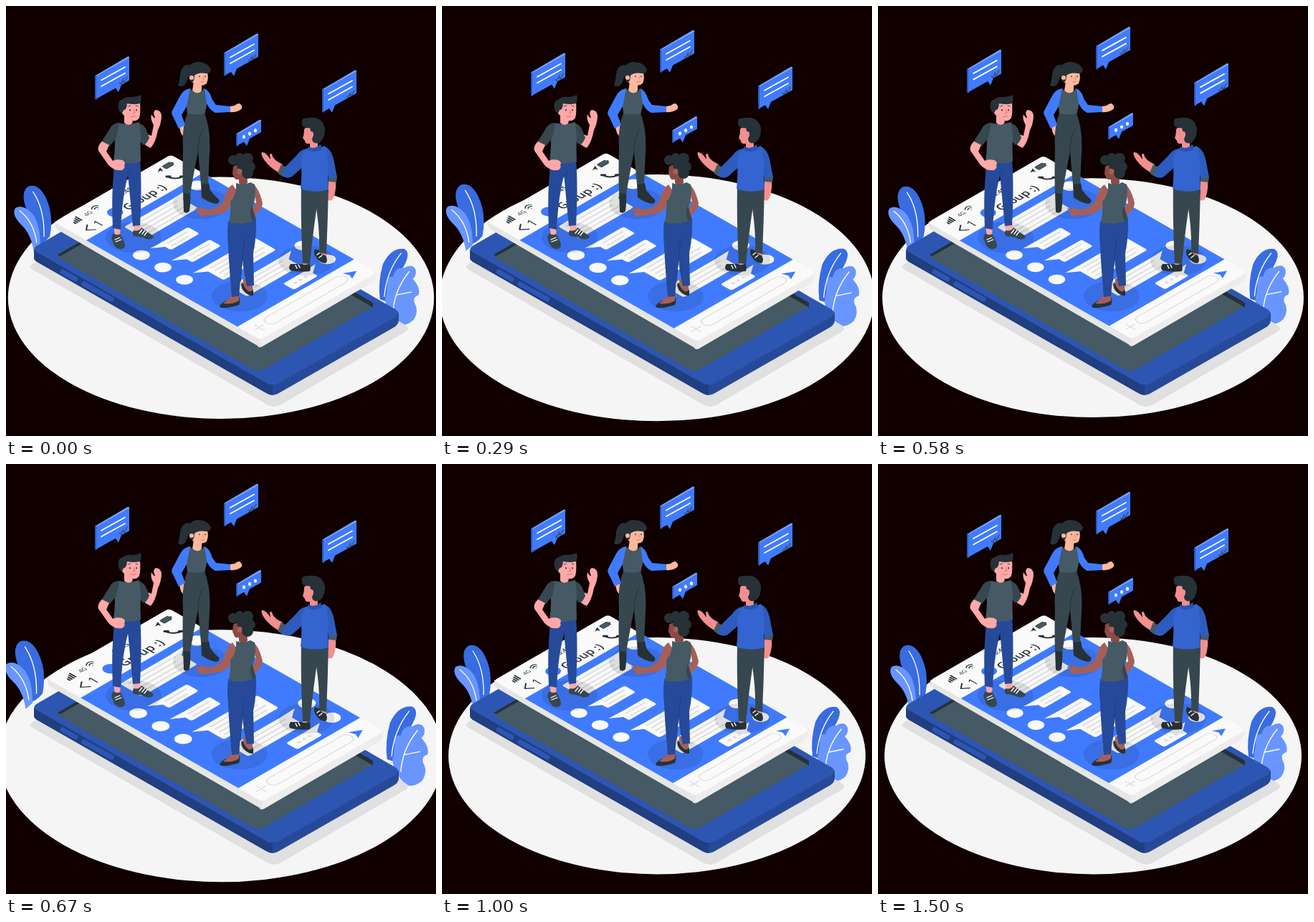
An HTML page that plays this animation: 600 by 600 pixels, repeating every 1540 ms.

```html
<!DOCTYPE html>
<html lang="en">
<head>
<meta charset="utf-8">
<title>Group chat</title>
<style>
html, body { margin: 0; width: 100%; height: 100%; overflow: hidden; background: #100000; }
svg { display: block; width: 100vw; height: 100vh; }
.blue { fill: #407bff; }
.mid { fill: #2d56b3; }
.deep { fill: #264a99; }
.slate { fill: #455a64; }
.char { fill: #37474f; }
.ink { fill: #263238; }
.pink { fill: #ffa8a7; }
.rose { fill: #f28f8f; }
.peach { fill: #ffb89d; }
.brown { fill: #a65f58; }
.white { fill: #fafafa; }
.line { fill: none; stroke-linecap: round; stroke-linejoin: round; }
text { font-family: "Open Sans", "Noto Sans", sans-serif; fill: #263238; }
</style>
</head>
<body>
<svg viewBox="0 0 600 600">
  <rect width="600" height="600" fill="#100000"/>
  <ellipse data-beat="300 407.2" cx="300" cy="407.2" rx="291" ry="165.2" fill="#f5f5f5"/>

  <g data-beat="294 347">
    <path fill="#386ce0" d="M48 334Q44 305 34 285Q25 261 37 253.500Q50 249 60 268Q72 292 66 322Q58 332 48 334Z"/>
    <path fill="#6995ff" d="M44 342Q40 318 27 306Q13 292 19 283Q30 277 43 292Q53 306 53 334Z"/>
    <path fill="#386ce0" d="M517 408Q514 385 521 360Q532 337 550 339Q560 344 550 362Q536 385 529 412Z"/>
    <path fill="#6995ff" d="M524 410Q527 396 527 385Q526 376 535 377Q538 364 550 365Q562 358 566 368Q567 376 562 380Q573 392 570 402Q562 404 564 412Q571 424 563 436Q552 446 541 441Q526 425 524 410Z"/>
    <path class="line" stroke="#fff" stroke-width="1.300" d="M43 261Q59 285 58 322M25 287Q44 302 48 330M546 345Q526 370 523 404M557 370Q537 395 535 424M540 402L560 398"/>
  </g>

  <path fill="#e0e0e0" d="M37 360L60 345L540 435L557 445Q565 450 557 455L384 556Q374 562 364 556L37 368Q31 364 37 360Z"/>
  <path class="deep" d="M39 340V351Q39 355 45 358L363 540Q372 546 381 540L542 448Q548 444 548 438V428Z"/>
  <path fill="#203e80" d="M39 340V351Q39 355 45 358L363 540Q368 543 372 543V525Z"/>
  <path class="mid" d="M44 334L205 241Q215 236 225 241L543 423Q551 428 543 434L381 526Q372 531 363 526L44 344Q35 339 44 334Z"/>
  <path class="ink" d="M72 347L232 254L512 414V421L232 262L80 352Z"/>
  <path class="slate" d="M74 350L232 260L511 420L360 507Q352 511 344 507L76 353Q72 351 74 350Z"/>
  <path class="line" stroke="#2d56b3" stroke-width="7" d="M79 371L97 381M109 388L147 409"/>

  <g data-beat="291.5 342">
    <path fill="#ededed" d="M350 458V472.500Q353 474 356 472.500L506 385Q511 382 511 377V368Z"/>
    <path fill="#e6e6e6" d="M73 301V307Q73 310 77 313L351 472Q353 473.500 354 473.500V458Z"/>
    <g id="screen" transform="matrix(.866 -.5 .866 .495 72 302.3)">
      <rect class="white" width="184" height="325" rx="5"/>
      <rect class="blue" y="50.5" width="184" height="238.500"/>
      <circle class="blue" cx="61" cy="35" r="9"/>
      <path class="line" stroke="#263238" stroke-width="1.600" d="M22 30L14 36.500L22 43"/>
      <text x="28" y="43" font-size="17">1</text>
      <text x="74" y="43" font-size="16" font-weight="600">Group :)</text>
      <path class="line" stroke="#263238" stroke-width="2" stroke-linecap="butt" d="M15 19V16M18 19V14M21 19V12M24 19V10"/>
      <text x="33" y="18" font-size="8">4G</text>
      <path class="line" stroke="#263238" stroke-width="1.300" d="M47 12Q52 7 57 12M49 14.500Q52 11.500 55 14.500M52 17V17"/>
      <text x="84" y="18" font-size="9" font-weight="600">15:45</text>
      <path class="ink" d="M150 13L158 9L155 17L154 13.500Z"/>
      <rect x="161" y="9" width="12" height="7" rx="1" class="slate" stroke="#263238" stroke-width=".8"/>
      <path class="ink" d="M173.500 11H175V14H173.500Z"/>
      <path class="line" stroke="#263238" stroke-width="2.600" d="M151 27Q152 38 164 40"/>
      <path class="line" stroke="#263238" stroke-width="4" d="M151 27L153 29M162 38L164 40"/>
      <g id="chat"></g>
      <rect x="28" y="299" width="125" height="15" rx="7" fill="none" stroke="#e0e0e0" stroke-width="1.500"/>
      <path class="line" stroke="#e0e0e0" stroke-width="1.600" d="M9 307H23M16 300V314"/>
      <path class="blue" d="M156 299L170 307L156 314L159 307Z"/>
    </g>
  </g>

  <g id="shade" opacity=".1"></g>
  <g id="float"></g>

  <!-- waving man -->
  <g>
    <path class="pink" d="M150 306H160L159 321L152 322ZM177 303H188L187 315L179 316Z"/>
    <path class="char" d="M150 317Q145 323 149 329Q151 337 158 339Q166 340 166 334Q165 326 159 318Q155 321 150 317ZM178 313Q175 319 179 321Q190 322 195 325Q205 327 206 321Q198 316 189 309Q186 315 178 313Z"/>
    <path class="line" stroke="#fff" stroke-width="1.300" d="M152 326L159 323M153 329L161 326M186 317L190 312M190 318L194 313M193 320L197 315"/>
    <path class="deep" d="M168 215H187Q190 250 187 306L177 307L171 245Z"/>
    <path class="deep" d="M151 215H183Q180 228 170 237Q162 268 160 312L149 310Q147 268 150 235Z"/>
    <path class="line" stroke="#203e80" d="M170 237L175 230"/>
    <path class="pink" d="M188 181L197 179L203 181L206 166Q201 158 203 151Q206 157 208 156Q204 147 209 145Q217 145 217 155Q216 166 212 173Q209 190 202 198Q196 196 188 188Z"/>
    <path class="char" d="M183 163Q193 164 197 176L200 184Q196 193 192 194L186 188Z"/>
    <path class="slate" d="M157 163Q172 167 186 162L188 182Q187 200 188 217Q170 222 150 217Q154 190 150 170Z"/>
    <path class="char" d="M158 163Q149 163 145 171L133 190Q138 195 145 195L154 184Z"/>
    <path class="pink" d="M134 189Q127 195 129 202L143 222Q152 231 162 229Q167 226 165 222Q168 218 162 215Q154 213 149 216L140 203L144 194Z"/>
    <path class="pink" d="M163 138Q165 129 175 133L187 134Q188 150 186 156Q183 161 177 160L176 164Q170 168 165 163V153Q160 149 162 144Z"/>
    <path class="ink" d="M157 142Q155 132 163 130Q168 126 176 127Q184 126 188 124Q190 130 187 136Q178 138 169 136Q168 146 164 145Q163 150 160 149Q157 146 157 142Z"/>
    <path class="line" stroke="#263238" stroke-width="1.800" d="M173 145V145.500M182 145V145.500"/>
    <path class="line" stroke="#263238" stroke-width=".8" d="M170 140L174 139M181 139L184 140"/>
    <path class="line" stroke="#d96e72" d="M178 145L180 149L177 150M174 154Q178 156 181 153"/>
  </g>

  <!-- woman with a ponytail -->
  <g>
    <path class="ink" d="M256 82Q245 82 243 95Q242 106 240 111Q248 115 252 106Q255 98 256 91Z"/>
    <path class="ink" d="M247 257H257Q258 272 256 286Q252 291 248 287ZM272 247H283L285 257Q290 264 297 270Q299 275 293 276Q282 274 273 267Z"/>
    <path class="peach" d="M262 106H273V118Q268 126 260 118ZM242 169L250 165L256 173Q258 182 254 186Q246 182 244 177ZM312 140L319 139Q325 134 327 137Q330 139 329 143Q324 149 312 148Z"/>
    <path class="slate" d="M257 115Q268 128 276 115Q283 118 282 130L277 152H253Q253 142 250 135Q249 120 257 115Z"/>
    <path class="char" d="M253 150Q265 153 277 150Q286 172 284 205L282 248L272 249L268 203Q263 228 257 262L247 261Q246 232 247 200Q245 170 253 150Z"/>
    <path class="line" stroke="#263238" d="M268 203Q268 185 275 172"/>
    <path class="blue" d="M257 115Q247 116 242 127L232 146Q230 150 233 154L241 171L250 166L245 152L252 140ZM277 115Q284 118 288 131L293 138L313 140V148L292 149Q285 146 280 136Z"/>
    <path class="peach" d="M258 96Q260 88 271 90L281 93Q283 101 280 108Q276 112 269 110L262 108Q256 105 258 96Z"/>
    <path class="ink" d="M254 95Q252 80 266 78Q282 78 286 89Q285 95 279 94Q268 92 263 97Q263 105 259 107Q255 104 254 95Z"/>
    <circle class="peach" cx="259" cy="100" r="3"/>
    <path class="line" stroke="#263238" stroke-width="1.600" d="M270 98V98.500M278 98V98.500"/>
    <path class="line" stroke="#d97a6b" d="M275 99L276 102M272 106Q275 107 277 105"/>
  </g>

  <!-- man in a sweater -->
  <g>
    <path class="rose" d="M380 232L386 221Q375 216 372 210Q371 204 368 207L369 214Q362 203 357 204Q355 208 362 217Q369 226 380 232ZM450 243L460 244Q461 258 457 268Q453 274 449 270Z"/>
    <path class="rose" d="M414 355H423V364H414ZM437 341H447V350H438Z"/>
    <path class="ink" d="M397 360Q393 366 397 369Q412 372 424 370Q426 364 423 359Q418 363 413 360ZM431 339Q428 345 433 351Q438 359 446 359Q450 355 446 348Q440 348 437 341Z"/>
    <path class="line" stroke="#fff" stroke-width="1.400" d="M404 362L406 366M408 361L410 365M434 347L438 344M437 351L441 348"/>
    <path class="char" d="M426 252H450Q449 300 447 346L437 344Q438 315 433 282Z"/>
    <path class="char" d="M412 252H450V258Q440 262 435 272Q429 310 424 360L414 359Q411 300 412 252Z"/>
    <path class="slate" d="M384 221L391 225L386 238L379 233ZM450 237L462 238L461 246L450 245Z"/>
    <path fill="#2e5cbe" d="M420 199Q411 200 405 209L390 224L385 237Q393 242 399 238L417 222ZM444 196Q453 198 457 213L462 239L450 240L446 220Z"/>
    <path fill="#3364cf" d="M421 198Q433 201 445 195Q451 210 449 230L450 256Q430 262 411 255Q413 235 412 222Q411 205 421 198Z"/>
    <path class="rose" d="M416 172Q421 166 430 171L435 183V197Q428 201 424 197V192Q417 193 417 188L414 184Q416 180 416 172Z"/>
    <path fill="#2954b2" d="M422 196Q430 201 439 193L441 200Q430 206 421 201Z"/>
    <path class="ink" d="M414 168Q411 160 415 157Q430 154 437 158Q446 164 445 175Q444 187 436 191Q428 193 427 186L429 180Q425 176 424 170Q418 171 414 168Z"/>
    <ellipse class="rose" cx="426" cy="179" rx="3" ry="4"/>
  </g>

  <!-- woman in front -->
  <g>
    <path class="brown" d="M345 249Q353 254 358 275Q358 282 348 292L342 294L341 287L349 275Z"/>
    <path class="ink" d="M299 417Q304 411 314 409L326 406Q327 413 325 417Q311 422 301 421Q297 420 299 417ZM329 386Q327 391 331 397Q338 405 345 404Q346 399 344 394Z"/>
    <path class="brown" d="M314 398H326L325 411Q316 417 303 415Q310 410 314 405ZM331 380H344V396Q341 401 336 396Q331 391 331 386Z"/>
    <path class="deep" d="M325 298H349Q350 320 345 345L346 390L336 391Q329 360 329 335Z"/>
    <path class="deep" d="M310 300Q325 304 347 299Q345 315 333 325Q328 370 325 405L315 406Q311 360 310 335Q308 315 310 300Z"/>
    <path class="line" stroke="#203e80" d="M333 325Q329 360 327 385"/>
    <path class="brown" d="M316 249Q308 254 304 270Q302 278 289 283Q279 286 272 280L271 284L264 282Q265 286 269 288Q266 291 272 293Q285 293 298 290Q309 288 314 278L322 258Z"/>
    <path fill="#8a4a46" d="M317 224Q326 217 336 226L337 247Q330 253 325 247V242Q318 243 318 238L316 234Z"/>
    <path class="slate" d="M321 247Q332 251 341 246L347 249Q350 266 344 281Q346 290 349 298Q330 307 311 302Q314 285 313 273Q322 265 321 247Z"/>
    <path class="char" d="M343 279Q338 288 344 300L349 298Q346 290 344 281Z"/>
    <g class="ink">
      <circle cx="317" cy="215" r="7"/><circle cx="326" cy="211" r="6"/><circle cx="337" cy="213" r="8"/>
      <circle cx="341" cy="224" r="7"/><circle cx="337" cy="233" r="8"/><circle cx="331" cy="222" r="9"/>
    </g>
    <ellipse cx="326" cy="231" rx="3.500" ry="4" class="brown"/>
  </g>
</svg>
<script>
const get = id => document.getElementById(id);

// Chat rows in screen coordinates: left, top, width, height, tail side
const rows = [
  [48, 62, 84, 33, 1], [53, 113, 45, 18, -1], [53, 147, 45, 18, -1],
  [53, 181, 83, 33, -1], [49, 228, 84, 27, 1], [95, 266, 38, 17, 1]
];
get('chat').innerHTML = rows.map(([x, y, w, h, side], i) => {
  const edge = side > 0 ? x + w : x;
  let inner = '';
  if (i === 5) {
    for (let n = 0; n < 3; n++) inner += `<circle cx="${x + 11 + n * 8}" cy="${y + 8.5}" r="2.3" fill="#e0e0e0"/>`;
  } else {
    for (let v = y + 6, n = 0; v < y + h - 3; v += 7, n++)
      inner += `<path class="line" stroke="#e0e0e0" stroke-width="2.4" d="M${x + 7} ${v}h${w - 14 - n % 2 * 6}"/>`;
  }
  return `<circle class="white" cx="${side > 0 ? 163 : 23}" cy="${y + 1.5}" r="9.5"/>
    <path class="white" d="M${edge - side * 6} ${y}L${edge + side * 14} ${y - 1}L${edge} ${y + 9}Z"/>
    <rect class="white" x="${x}" y="${y}" width="${w}" height="${h}" rx="3"/>${inner}`;
}).join('');

get('shade').innerHTML = [[178, 323], [272, 276], [326, 405], [419, 355]]
  .map(([x, y]) => `<ellipse cx="${x}" cy="${y}" rx="39" ry="21.5"/>`).join('');

// Skewed speech bubble whose top left corner is at x, y
function bubble(x, y, w, h, tail, dots) {
  const at = (u, v) => `${u} ${v - u * .555}`;
  const stroke = 'class="line" stroke="#fff" stroke-width="1.8"';
  let inner = '';
  if (dots) {
    for (let n = 0; n < 3; n++) inner += `<ellipse cx="${11 + n * 8}" cy="${5 - n * 4.4}" rx="2.1" ry="2.6" fill="#fff"/>`;
  } else {
    const tick = u => `M${at(u, 29.5)}l2 2l4 -7.500`;
    inner = `<path ${stroke} d="M${at(9, 12)}L${at(42, 12)}M${at(9, 20.5)}L${at(42, 20.5)}"/>
      <path class="line" stroke="#37474f" stroke-width="1.100" d="${tick(34)}${tick(39)}"/>`;
  }
  return `<g transform="translate(${x} ${y})">
    <path fill="#79a2ff" d="M0 1L${at(w - 2, -.5)}L${at(w, 1)}V${3 - w * .555}L2 4Z"/>
    <path class="mid" d="M0 0L3 1.500V${h}L1 ${h}L0 ${h - 1}Z"/>
    <path class="blue" d="M2 1.500L${at(w, 2.5)}L${at(w, h)}L${at(tail + 8, h)}L${at(tail + 4, h + 8)}L${at(tail, h)}L2 ${h - 1}Z"/>${inner}</g>`;
}
get('float').innerHTML = bubble(124, 97, 48, 34, 29) + bubble(304, 65, 48, 33, 10)
  + bubble(441, 116, 48, 33, 10) + bubble(321, 178, 35, 18, 11, true);

const LOOP = 1540, CYCLE = 1500, STEP = 1000 / 24, LEAD = 32;
const beat = [[0, 1], [150, 1.1], [450, 1], [600, 1], [750, 1.1], [900, 1], [1500, 1]];
const lift = [[0, 0], [750, -12], [1500, 0]];
const pulsing = [...document.querySelectorAll('[data-beat]')]
  .map(el => [el, ...el.dataset.beat.split(' ').map(Number)]);

function sample(keys, t) {
  const i = Math.max(1, keys.findIndex(k => k[0] >= t));
  const [a, from] = keys[i - 1], [b, to] = keys[i];
  return from + (to - from) * (t - a) / (b - a);
}

function draw(ms) {
  const tick = Math.floor((ms % LOOP + 5) / STEP);
  const t = Math.min(CYCLE, tick * STEP + LEAD);
  const s = sample(beat, t);
  for (const [el, x, y] of pulsing)
    el.setAttribute('transform', `translate(${x * (1 - s)} ${y * (1 - s)}) scale(${s})`);
  get('float').setAttribute('transform', `translate(0 ${sample(lift, t)})`);
}

const start = performance.now();
function frame(now) {
  draw(Math.max(0, now - start));
  requestAnimationFrame(frame);
}
draw(0);
requestAnimationFrame(frame);
</script>
</body>
</html>
```
